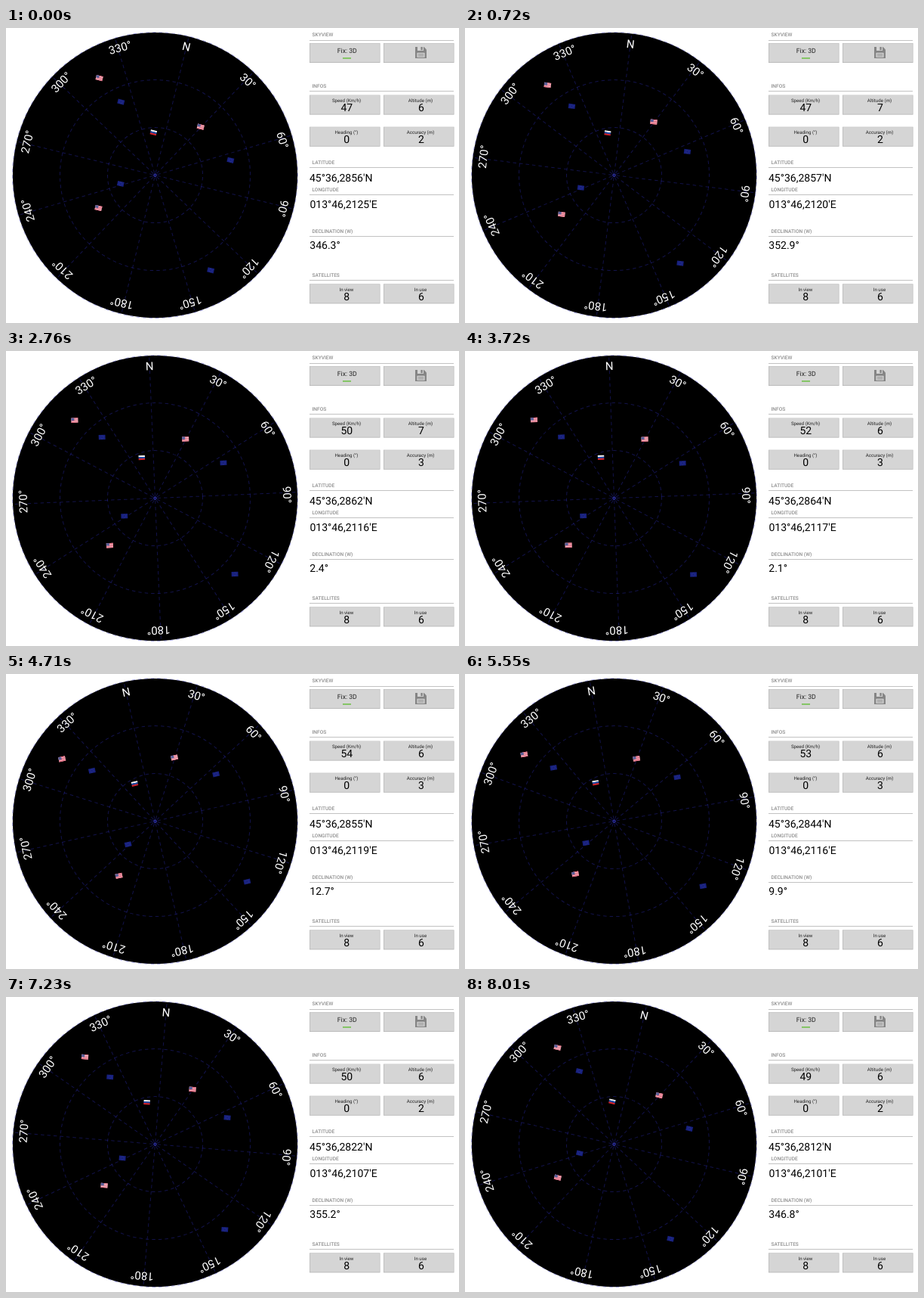
Animation of 600 by 390 pixels, one loop 8040 ms. Source, as an HTML page:

```html
<!DOCTYPE html>
<html lang="en">
<head>
<meta charset="utf-8">
<title>Skyview</title>
<style>
  html, body { margin: 0; width: 100%; height: 100%; overflow: hidden; background: #fff; }
  svg { display: block; width: 600px; height: 390px; font-family: Roboto, Arial, sans-serif; text-rendering: geometricPrecision; }
  .head { font-size: 6.6px; font-weight: 500; fill: #8e8e8e; }
  .big { font-size: 14px; fill: #000; }
  .mid { text-anchor: middle; }
  .cap { font-size: 6.2px; fill: #222; text-anchor: middle; }
  .mark { font-size: 15px; fill: #fff; text-anchor: middle; }
  .grid { fill: none; stroke: rgba(50, 50, 205, .36); stroke-width: 1; stroke-dasharray: 4.5 4; }
</style>
</head>
<body>
<svg id="stage" viewBox="0 0 600 390"></svg>
<script>
const LOOP = 8040, STEP = 30;
const CX = 197.5, CY = 194.6, R = 188.6;
const DEGREE = 5.6; // width of the degree sign in a mark
const stage = document.getElementById('stage');

function add(parent, tag, attrs, text) {
  const el = document.createElementNS('http://www.w3.org/2000/svg', tag);
  for (const k in attrs) el.setAttribute(k, attrs[k]);
  if (text !== undefined) el.textContent = text;
  parent.appendChild(el);
  return el;
}
const rect = (p, x, y, width, height, fill) => add(p, 'rect', { x, y, width, height, fill });
const label = (cls, x, y, text) => add(stage, 'text', { class: cls, x, y }, text);

// Sky plot
add(stage, 'circle', { cx: CX, cy: CY, r: R, fill: '#000' });
const sky = add(stage, 'g', {});
for (const part of [1 / 3, 2 / 3, 1]) add(sky, 'circle', { class: 'grid', r: (R + .4) * part });
for (let a = 0; a < 360; a += 30) {
  const arm = add(sky, 'g', { transform: `rotate(${a})` });
  add(arm, 'line', { class: 'grid', y1: -3, y2: -R });
  // digits are centred on the spoke, the degree sign hangs to the right
  add(arm, 'text', { class: 'mark', x: a ? DEGREE / 2 : 0, y: -169.6 }, a ? a + '°' : 'N');
}
add(sky, 'circle', { r: 1.6, fill: '#05051c', stroke: '#3c40d8', 'stroke-width': 1 });

const flags = {
  us(g) {
    rect(g, -4.5, -3.1, 9, 6.2, '#f3d2d8');
    for (let i = 0; i < 4; i++) rect(g, -4.5, -3.1 + i * 1.77, 9, .89, '#e0506a');
    rect(g, -4.5, -3.1, 4, 3.4, '#565f98');
  },
  eu(g) {
    rect(g, -4.4, -3.1, 8.8, 6.2, '#17207f');
    add(g, 'circle', { r: 2, fill: 'none', stroke: '#46508c', 'stroke-width': .6, 'stroke-dasharray': '.5 .55' });
  },
  ru(g) {
    ['#ffffff', '#2350b0', '#d8232c'].forEach((c, i) => rect(g, -4.2, -3 + i * 2, 8.4, 2, c));
  }
};
// kind, azimuth, distance from centre
[
  ['us', -43.6, 148.2], ['eu', -38.7, 107], ['ru', -15.9, 56.4], ['us', 29.6, 87.9],
  ['eu', 65.1, 101.8], ['eu', 135.95, 145.7], ['eu', -117.75, 47.1], ['us', -133.74, 86.7]
].forEach(([kind, az, r]) => {
  const a = az * Math.PI / 180;
  flags[kind](add(sky, 'g', { transform: `translate(${r * Math.sin(a)} ${-r * Math.cos(a)})` }));
});

// Side panel
[['SKYVIEW', 9, 16], ['INFOS', 77, 83], ['LATITUDE', 177.6, 184], ['LONGITUDE', 213.6, 220],
 ['DECLINATION (W)', 269, 275], ['SATELLITES', 327, 333]].forEach(([name, y, line]) => {
  label('head', 405.5, y + 2.4, name);
  rect(stage, 402, line, 191, 1, '#c2c2c2');
});

function button(x, y) {
  rect(stage, x, y, 93.5, 26, '#b4b4b4');
  rect(stage, x + .6, y + .4, 92.3, 24.8, '#d5d5d5');
}
function field(col, y, name, value) {
  button(col ? 500 : 402, y);
  label('cap', col ? 549 : 451, y + 9.3, name);
  return label('big mid', col ? 550 : 451.3, y + 21.7, value);
}

button(402, 20);
button(500, 20);
add(stage, 'text', { class: 'mid', x: 451.8, y: 33, 'font-size': 8.7, fill: '#222' }, 'Fix: 3D');
rect(stage, 446, 39, 11, 1.8, '#7cc35a');
add(stage, 'path', { d: 'M542 25h11.6l3.4 3.4v11.6h-15z', fill: '#858585' });
rect(stage, 545, 25, 8, 5, '#d5d5d5');
rect(stage, 549.4, 25, 2.4, 4.2, '#858585');
rect(stage, 544.4, 32.8, 10.2, 6, '#d5d5d5');
rect(stage, 545.6, 34.2, 7.8, 1, '#858585');
rect(stage, 545.6, 36.4, 7.8, 1, '#858585');

const speed = field(0, 88.6, 'Speed (Km/h)');
const altitude = field(1, 88.6, 'Altitude (m)');
field(0, 130.7, 'Heading (°)', 0);
const accuracy = field(1, 130.7, 'Accuracy (m)');
field(0, 338.4, 'In view', 8);
field(1, 338.4, 'In use', 6);
const lat = label('big', 402, 203.3);
const lon = label('big', 402.4, 238.1);
const decl = label('big', 402.3, 292);

// Motion
const times = [0, 720, 1770, 3720, 4710, 6330, 8010];
const track = {
  turn: [-13.7, -7.1, 2.9, 2.1, 12.7, 4, -13.2],
  speed: [47, 47, 48, 52, 54, 52, 49],
  lat: [2856, 2857, 2859, 2864, 2855, 2834, 2812],
  lon: [2125, 2120, 2115, 2117, 2119, 2113, 2101]
};
function segment(t) {
  let i = 0;
  while (i < times.length - 2 && t >= times[i + 1]) i++;
  const span = times[i + 1] - times[i];
  return { i, span, u: (t - times[i]) / span };
}
function step(values, t) {
  const { i, u } = segment(t);
  return Math.round(values[i] + (values[i + 1] - values[i]) * u);
}
function smooth(v, t) {
  const { i, span, u } = segment(t);
  const slope = k => {
    const a = Math.max(k - 1, 0), b = Math.min(k + 1, v.length - 1);
    return (v[b] - v[a]) / (times[b] - times[a]) * span;
  };
  const w = 1 - u;
  return v[i] * (1 + 2 * u) * w * w + slope(i) * u * w * w
    + v[i + 1] * u * u * (3 - 2 * u) - slope(i + 1) * u * u * w;
}

function draw(t) {
  const turn = smooth(track.turn, t);
  sky.setAttribute('transform', `translate(${CX} ${CY}) rotate(${-turn})`);
  decl.textContent = (Math.round(turn * 10) + 3600) % 3600 / 10 + '°';
  lat.textContent = `45°36,${step(track.lat, t)}'N`;
  lon.textContent = `013°46,${step(track.lon, t)}'E`;
  speed.textContent = step(track.speed, t);
  altitude.textContent = t >= 420 && t < 2850 ? 7 : 6;
  accuracy.textContent = t >= 2040 && t < 6900 ? 3 : 2;
}

const start = performance.now();
function tick() {
  const t = (performance.now() - start) % LOOP;
  draw(Math.floor(t / STEP) * STEP);
  requestAnimationFrame(tick);
}
tick();
</script>
</body>
</html>
```
